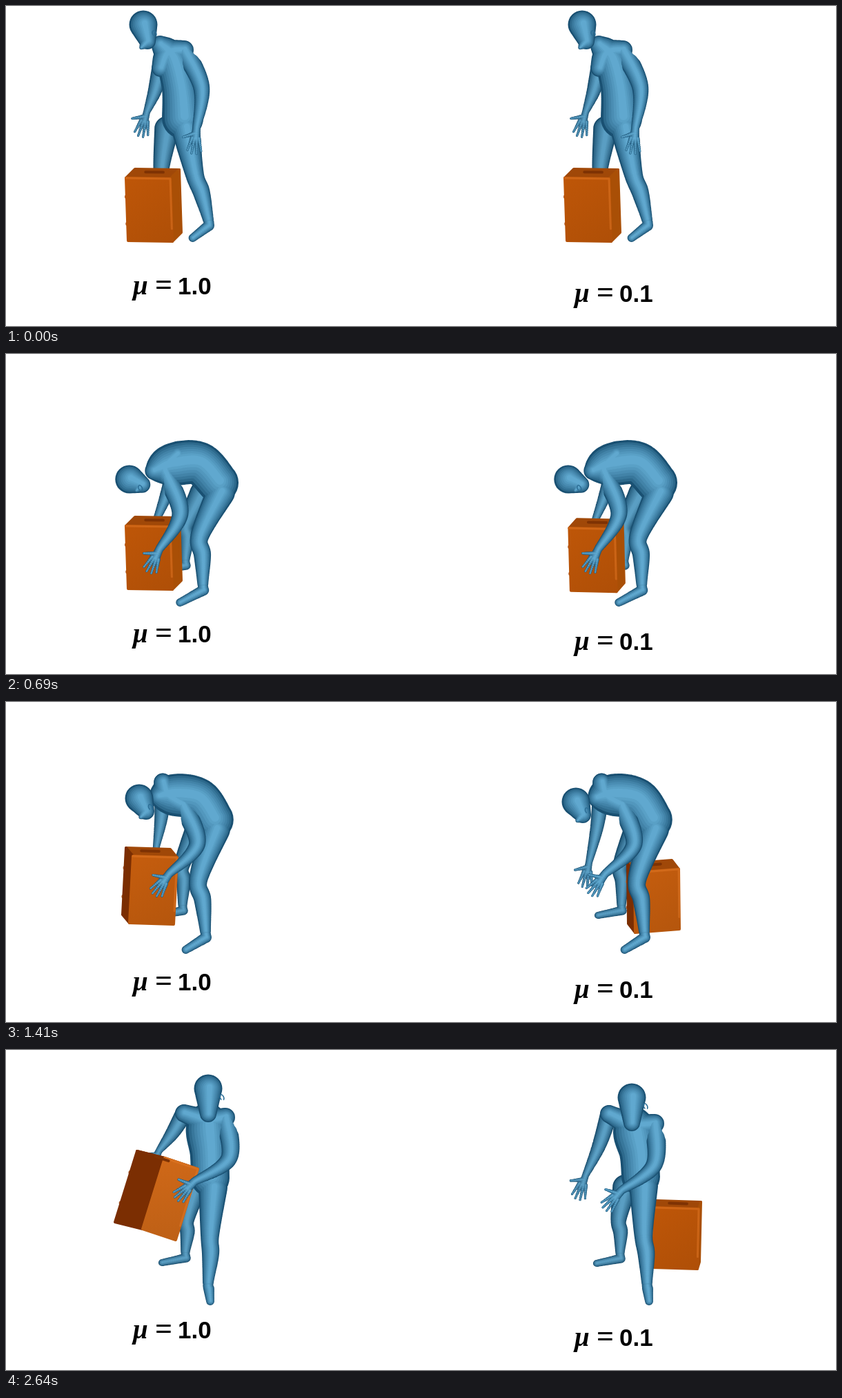
An HTML page with a canvas that plays this animation: 1203 px wide and 465 px high, repeating every 2670 ms.

```html
<!DOCTYPE html>
<html lang="en">
<head>
<meta charset="utf-8">
<title>Lifting with two friction values</title>
<style>
  html, body { margin: 0; height: 100%; overflow: hidden; background: #fff; }
  canvas { display: block; }
</style>
</head>
<body>
<canvas id="stage" width="1203" height="465"></canvas>
<script>
const ctx = document.getElementById('stage').getContext('2d');
const LOOP = 2670, STEP = 30, RIGHT_X = 636;

const add = (p, q, u = 1) => p.map((x, n) => x + q[n] * u);
const mix = (p, q, u) => p.map((x, n) => x + (q[n] - x) * u);
const rgb = color => `rgb(${color.map(Math.round)})`;

// Four key poses; elbows, knees, spine, feet and face follow from these points.
const stand = {
  turn: [0], head: [199, 27], jaw: [6, 24], chest: [241, 77], shoulder: [258, 64], hip: [256, 163],
  nearWrist: [276, 178], farWrist: [204, 154], nearAnkle: [293, 310], farAnkle: [232, 298]
};
const bend = {
  turn: [0], head: [178, 188], jaw: [19, 7], chest: [240, 164], shoulder: [231, 180], hip: [309, 188],
  nearWrist: [220, 288], farWrist: [218, 246], nearAnkle: [285, 335], farAnkle: [261, 298]
};
const lift = {
  turn: [0.1], head: [193, 140], jaw: [10, 19], chest: [242, 135], shoulder: [256, 150], hip: [300, 171],
  nearWrist: [236, 250], farWrist: [218, 210], nearAnkle: [289, 333], farAnkle: [256, 294]
};
const hold = {
  turn: [1], head: [293, 56], jaw: [0, 37], chest: [292, 112], shoulder: [318, 98], hip: [296, 186],
  nearWrist: [273, 191], farWrist: [222, 146], nearAnkle: [293, 338], farAnkle: [260, 293]
};
const slip = { ...lift, head: [190, 145], nearWrist: [232, 250], farWrist: [209, 233] };
const rest = {
  ...hold, head: [271, 69], chest: [275, 117], shoulder: [304, 107], hip: [284, 184],
  nearWrist: [256, 204], farWrist: [204, 182], farAnkle: [254, 294]
};

// A box seen in parallel projection: front top corner and three edges.
const box = (corner, across, depth, down) => ({ corner, across, depth, down });
const floorBox = box([174, 250], [64, 1], [13, -13], [3, 91]);
const FIRM = {
  poses: [stand, bend, lift, hold],
  boxes: [floorBox, floorBox,
    box([184, 224], [64, 2], [-10, -12], [-5, 97]),
    box([230, 157], [48, 16], [-40, -10], [-32, 103])]
};
const SLIPPERY = {
  poses: [stand, bend, slip, rest],
  boxes: [floorBox,
    box([198, 261], [71, 3], [6, -12], [1, 90]),
    box([275, 248], [64, -5], [-10, -13], [1, 87]),
    box([304, 229], [64, 2], [3, -10], [-2, 87])]
};

const TIMES = [0, 960, 1410, 1920];
const BODY_EASE = [u => 1 - (1 - u) ** 2.6, u => u * u, u => 1 - (1 - u) ** 1.4];
const BOX_EASE = [u => u ** 4, u => u, BODY_EASE[2]];

function blendKeys(keys, eases, time) {
  const i = time < TIMES[1] ? 0 : time < TIMES[2] ? 1 : 2;
  const u = Math.min(1, (time - TIMES[i]) / (TIMES[i + 1] - TIMES[i]));
  const result = {};
  for (const part in keys[i]) result[part] = mix(keys[i][part], keys[i + 1][part], eases[i](u));
  return result;
}

// Middle joint of a limb, pushed sideways from the straight line.
function joint(from, to, bow) {
  const [dx, dy] = [to[0] - from[0], to[1] - from[1]];
  const length = Math.hypot(dx, dy);
  return add(mix(from, to, .5), [dy / length, -dx / length], bow(length));
}

// Closely spaced circles along a smooth curve through [x, y, r] points.
function tube(...chain) {
  const circles = [];
  for (let i = 0; i < chain.length - 1; i++) {
    const p = chain[i], q = chain[i + 1];
    const before = chain[i - 1] || p, after = chain[i + 2] || q;
    const count = Math.ceil(Math.hypot(q[0] - p[0], q[1] - p[1]) / 2.5) || 1;
    for (let n = 0; n <= count; n++) {
      const u = n / count, v = 1 - u;
      circles.push(p.map((x, d) => x * v * v * (1 + 2 * u) + q[d] * u * u * (3 - 2 * u)
        + u * v * ((q[d] - before[d]) / 2 * v - (after[d] - x) / 2 * u)));
    }
  }
  return circles;
}

function arm(shoulder, wrist, bow, size) {
  const elbow = joint(shoulder, wrist, bow);
  // The hand continues the forearm and hangs a little.
  const dx = wrist[0] - elbow[0], dy = wrist[1] - elbow[1] + 16;
  const reach = 37 / Math.hypot(dx, dy);
  const ray = (angle, length, r) => [
    wrist[0] + reach * length * (dx * Math.cos(angle) - dy * Math.sin(angle)),
    wrist[1] + reach * length * (dx * Math.sin(angle) + dy * Math.cos(angle)), r];
  const fingers = [-.3, -.1, .1, .3].map(a => tube(ray(a * 1.1, .4, 3), ray(a, 1 - a * a, 1.6)));
  return [
    tube([...shoulder, 15 * size], [...elbow, 12 * size], [...wrist, 6 * size]),
    tube([...wrist, 6 * size], ray(0, .4, 7 * size)),
    ...fingers,
    tube(ray(.2, .2, 3.5), ray(.9, .62, 1.8))
  ];
}

function leg(hip, ankle, bow, size, toeOffset) {
  const knee = joint(hip, ankle, length => -bow * length);
  const calf = add(mix(knee, ankle, .4), [2, 0]);
  const heel = add(ankle, [1, 9]);
  return [
    tube([...hip, 21 * size], [...knee, 13.5 * size], [...calf, 12.5 * size],
      [...ankle, 8 * size], [...heel, 8 * size]),
    tube([...heel, 8 * size], [...add(ankle, toeOffset), 6 * size])
  ];
}

// Nested, ever lighter layers give the tubes a soft round shading.
function shade(tubes, brightness = 1, softStart = 0) {
  const LAYERS = 8;
  for (let k = 0; k < LAYERS; k++) {
    const u = k / (LAYERS - 1), scale = 1 - .8 * u;
    ctx.fillStyle = rgb(mix([25, 80, 114], [96, 168, 207], u ** .65).map(c => c * brightness));
    ctx.beginPath();
    tubes.forEach((circles, n) => {
      const skip = n ? 0 : Math.round(softStart * (1 - u));
      for (const [x, y, r] of circles.slice(skip)) {
        const cx = x + .1 * r * u, cy = y - .1 * r * u;
        ctx.moveTo(cx + r * scale, cy);
        ctx.arc(cx, cy, r * scale, 0, 7);
      }
    });
    ctx.fill();
  }
}

function drawHead({ head, jaw, turn: [turn] }) {
  const chin = add(head, jaw);
  const nose = add(add(head, jaw, 1.05), [-9, 8], 1 - turn);
  shade([tube([...head, 20.5], [...chin, 12]), tube([...chin, 11], [...nose, 3])]);
  const ear = add(head, [16 + 4 * turn, 13]);
  ctx.strokeStyle = '#2d6f97';
  ctx.lineWidth = 1.5;
  ctx.beginPath();
  ctx.ellipse(...ear, 2.5, 4.5, -.4, 2.6, 7.4);
  ctx.stroke();
}

function polygon(corners, fill) {
  ctx.beginPath();
  corners.forEach(corner => ctx.lineTo(...corner));
  ctx.closePath();
  ctx.fillStyle = ctx.strokeStyle = fill;
  ctx.lineWidth = 4;
  ctx.lineJoin = 'round';
  ctx.fill();
  ctx.stroke();
}

function line(color, width, ...path) {
  ctx.strokeStyle = color;
  ctx.lineWidth = width;
  ctx.lineCap = 'round';
  ctx.beginPath();
  path.forEach(p => ctx.lineTo(...p));
  ctx.stroke();
}

function drawBox({ corner: a, across, depth, down }) {
  const b = add(a, across), backA = add(a, depth), backB = add(b, depth);
  const facesRight = depth[0] > 0;
  const front = mix([190, 86, 8], [207, 104, 24], Math.min(1, Math.max(0, -depth[0] / 25)));
  const [edge, backEdge] = facesRight ? [b, backB] : [a, backA];

  for (const u of [.3, .73]) {
    const knob = add(facesRight ? a : backA, down, u);
    line('#b96a3c', 6, knob, knob);
  }
  polygon([a, b, backB, backA], '#a04808');
  polygon([edge, backEdge, add(backEdge, down), add(edge, down)], facesRight ? '#a94f06' : '#7b2e02');

  const bottomA = add(a, down), bottomB = add(b, down);
  const fill = ctx.createLinearGradient(...a, ...bottomB);
  fill.addColorStop(0, rgb(front));
  fill.addColorStop(1, rgb(front.map(c => c * .92)));
  polygon([a, b, bottomB, bottomA], fill);

  line('rgba(228, 122, 40, .45)', 3, a, b, add(b, down, .8));
  line('#7e3203', 4, ...[.3, .7].map(u => mix(mix(a, backA, .7), mix(b, backB, .7), u)));
}

function drawScene({ poses, boxes }, time, boxInFront) {
  const pose = blendKeys(poses, BODY_EASE, time);
  const bag = blendKeys(boxes, BOX_EASE, time);

  // While bending down, the upper body swings around the hip.
  const lean = time < 480 ? Math.sin(Math.PI * time / 480) : 0;
  const swing = { head: 1, chest: .6, shoulder: .6, nearWrist: .5, farWrist: .5 };
  for (const part in swing) pose[part] = add(pose[part], [-14, -11], lean * swing[part]);

  const { head, chest, shoulder, hip, turn: [turn] } = pose;
  const spine = add(hip, chest, -1);
  const stoop = spine[0] / Math.hypot(...spine);
  const neck = mix(chest, head, .42);
  const belly = add(mix(chest, hip, .5), [spine[1], -spine[0]], .24 * stoop);
  const farShoulder = add(add(chest, add(chest, shoulder, -1)), [-8, -34], turn);
  const torso = [
    tube([...neck, 13], [...chest, 23 + 8 * Math.max(stoop, turn)],
      [...belly, 25 + 7 * Math.max(stoop, turn / 2)], [...hip, 30 - 2 * turn]),
    tube([...farShoulder, 13], [...mix(chest, neck, .4), 17], [...shoulder, 14])
  ];
  const nearLeg = leg(add(hip, [4, 14]), pose.nearAnkle, .14 * stoop, 1,
    [-34 + 14 * (1 - stoop) * (1 - turn) + 37 * turn, 27]);
  const farLeg = leg(add(hip, [-23, 15]), pose.farAnkle, .05 + .07 * stoop, .85, [-34, 16]);

  shade(arm(farShoulder, pose.farWrist, length => .03 * length, .85), .95);
  shade(farLeg, .94);
  if (!boxInFront) drawBox(bag);
  shade([...torso, ...nearLeg]);
  if (boxInFront) drawBox(bag);
  drawHead(pose);
  const elbowBow = length => Math.sqrt(Math.max(100, 60 ** 2 - length ** 2 / 4));
  shade(arm(shoulder, pose.nearWrist, elbowBow, 1), 1, 12);
}

function drawLabel(x, baseline, value) {
  const write = (text, dx, dy, font) => {
    ctx.font = font;
    ctx.fillText(text, x + dx, baseline + dy);
  };
  ctx.fillStyle = '#000';
  write('μ', 0, 0, 'italic bold 39px "Liberation Serif", serif');
  write('=', 32, 0, 'bold 44px "Liberation Serif", serif');
  write(value, 65, 0, 'bold 35px "Liberation Sans", sans-serif');
}

function frame(now) {
  const time = Math.floor(now % LOOP / STEP) * STEP;
  ctx.fillStyle = '#fff';
  ctx.fillRect(0, 0, 1203, 465);
  drawScene(FIRM, time, true);
  ctx.save();
  ctx.translate(RIGHT_X, 0);
  drawScene(SLIPPERY, time, false);
  ctx.restore();
  drawLabel(184, 419, '1.0');
  drawLabel(824, 430, '0.1');
  requestAnimationFrame(frame);
}
requestAnimationFrame(frame);
</script>
</body>
</html>
```
